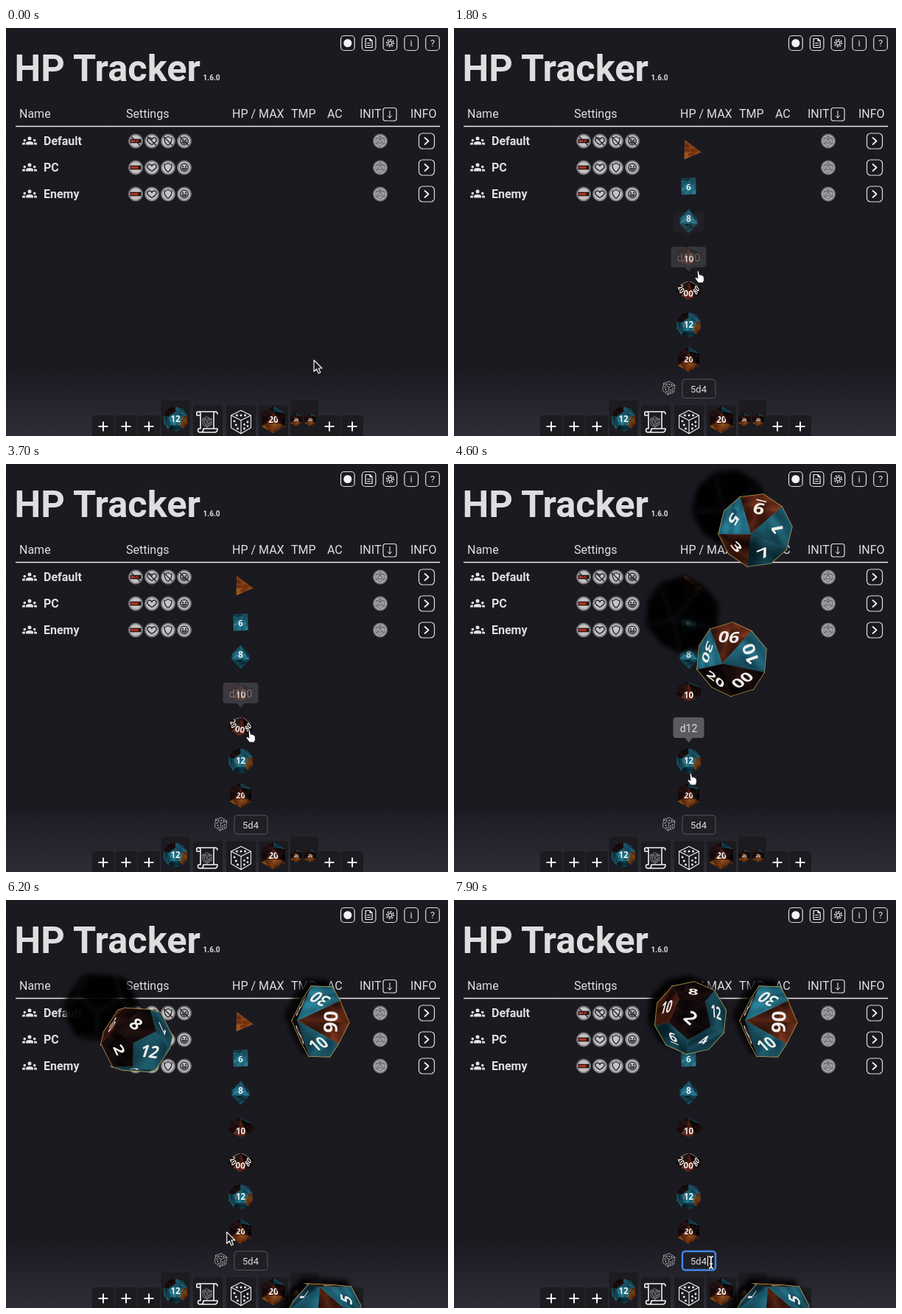
Animation of 600x554 px, one loop 8000 ms. Source, as an HTML page with a canvas:

```html
<!DOCTYPE html>
<html lang="en">
<head>
<meta charset="utf-8">
<title>HP Tracker</title>
<style>
  html, body { margin: 0; width: 100%; height: 100%; overflow: hidden; background: #1b1920; }
  svg, canvas { position: absolute; left: 0; top: 0; width: 600px; height: 554px; }
  text { font-family: Roboto, "Liberation Sans", sans-serif; fill: #dededf; }
  .mid { text-anchor: middle; dominant-baseline: central; }
  .line { fill: none; stroke: #f2f2f2; stroke-linecap: round; stroke-linejoin: round; }
  .dark { fill: none; stroke: #29282c; stroke-width: 1.4; stroke-linejoin: round; }
  .box { fill: #1a191e; stroke: #e0e0e0; stroke-width: 1.2; }
  .slot { fill: #1c1b20; }
</style>
</head>
<body>
<svg viewBox="0 0 600 554" xmlns="http://www.w3.org/2000/svg">
  <defs>
    <linearGradient id="bg" x2="0" y2="1">
      <stop offset="0" stop-color="#1b1a20"/><stop offset=".83" stop-color="#1b1920"/><stop offset="1" stop-color="#2e2c35"/>
    </linearGradient>
    <radialGradient id="coin"><stop offset=".7" stop-color="#c4c4c5"/><stop offset="1" stop-color="#8d8d90"/></radialGradient>
    <g id="cube">
      <path class="line" d="M0-14 12-8V7L0 14-12 7V-8ZM-12-8 0-2 12-8M0-2V14"/>
      <path class="line" stroke-width="2.600" d="M0-8h0M-5-8h0M5-8h0M-8-1h0M-6 3.500h0M-4 8h0M4 3h0M8 0h0M8 5h0M4 8h0"/>
    </g>
    <g id="people" fill="#e4e4e4">
      <circle cy="-3.400" r="2.500"/><path d="M-5 5V3Q-5 .5 0 .5T5 3V5Z"/>
      <circle cx="-6.700" cy="-1" r="1.800"/><path d="M-10 5V3.500Q-10 1.800-6.300 1.800L-6 5Z"/>
      <circle cx="6.700" cy="-1" r="1.800"/><path d="M10 5V3.500Q10 1.800 6.300 1.800L6 5Z"/>
    </g>
    <circle id="coinface" r="9.300" fill="url(#coin)" stroke="#737377" stroke-width="1.500"/>
  </defs>

  <rect width="600" height="554" fill="url(#bg)"/>
  <text x="11.500" y="71.500" font-size="50.500" font-weight="700">HP Tracker</text>
  <text x="267.500" y="71" font-size="10" font-weight="700">1.6.0</text>
  <g id="tools"></g>
  <g id="head" font-size="16"></g>
  <rect x="512" y="108.500" width="18" height="17.500" rx="3" class="box" stroke-width="1"/>
  <path class="line" d="M521 112.500V122M518.500 119.500 521 122 523.500 119.500"/>
  <path d="M13 133.500H589" stroke="#e6e6e6" stroke-width="1.500"/>
  <g id="rows"></g>
  <g id="dock"></g>
  <g id="panel">
    <use href="#cube" transform="translate(291.500 489) rotate(8) scale(.64)" opacity=".85"/>
    <rect id="field" x="310" y="477" width="45" height="25.500" rx="4" fill="#201f25"/>
    <text x="332" y="490" font-size="13" class="mid">5d4</text>
    <path id="caret" d="M344.500 483V497" stroke="#fff"/>
  </g>
</svg>
<canvas id="tray" width="600" height="554"></canvas>
<svg id="tips" viewBox="0 0 600 554"></svg>
<canvas id="table" width="600" height="554"></canvas>
<svg viewBox="0 0 600 554">
  <g id="cursor">
    <path d="M0 0V15.500L3.600 12 6.200 18 8.800 16.800 6.300 11H11Z" fill="#17161a" stroke="#f4f4f4" stroke-width="1.200" stroke-linejoin="round"/>
    <path d="M-3-7.500Q-1.500-9-.6-7.300L.5-2.500Q1.800-4 2.600-2.300 4-3.200 4.600-1.500 6-2 6.200 0L6.500 4.500 5 8H-1.500L-6 2Q-6 0-4 .6L-2.200 2Z" fill="#fff" stroke="#161519"/>
    <path d="M-3-8Q0-8 0-5V5Q0 8-3 8M3-8Q0-8 0-5M0 5Q0 8 3 8M-2 2H2" fill="none" stroke="#fff" stroke-width="1.600"/>
  </g>
</svg>
<script>
const LOOP = 8000, STEP = 100;
const $ = id => document.getElementById(id);
const clamp = v => Math.max(0, Math.min(1, v));
const at = (x, y, body, s = 1) => `<g transform="translate(${x} ${y}) scale(${s})">${body}</g>`;

// Header, tool buttons, group rows, dock
const labels = { Name: 18, Settings: 163, 'HP / MAX': 307, TMP: 387, AC: 436, INIT: 480, INFO: 549 };
$('head').innerHTML = Object.entries(labels).map(([s, x]) => `<text x="${x}" y="122">${s}</text>`).join('');

const tools = [
  '<circle r="5.500" fill="#f4f4f4"/>',
  '<path class="line" stroke-width="1.200" d="M-4.500-6H1.500L4.500-3V6H-4.500ZM1.500-6V-3H4.500M-2 0H2M-2 3H2"/>',
  '<circle class="line" r="2.600" stroke-width="1.200"/><circle class="line" r="4.800" stroke-width="1.500" stroke-dasharray="1 2.770"/>',
  '<text class="mid" font-size="13">i</text>',
  '<text class="mid" font-size="13">?</text>'
];
$('tools').innerHTML = tools.map((icon, i) =>
  at(463.8 + 28.8 * i, 20.5, '<rect x="-9.300" y="-10" width="18.600" height="20" rx="4.500" class="box"/>' + icon)).join('');

const badges = [
  '<rect x="-7.500" y="-2.800" width="15" height="5.600" fill="#241312"/><rect x="-6.500" y="-1.500" width="10" height="3" fill="#b8321f"/>',
  '<path class="dark" d="M0 5Q-10-1-4-4.500Q-1-5 0-2Q1-5 4-4.500Q10-1 0 5Z"/>',
  '<path class="dark" d="M0-6Q3-4 5-4Q5 3 0 6Q-5 3-5-4Q-3-4 0-6Z"/>',
  '<circle class="dark" r="5.300"/><path class="dark" d="M-3 1Q0 5.500 3 1Z"/><circle cx="-2" cy="-1.500" r="1"/><circle cx="2" cy="-1.500" r="1"/>'
];
const coin = body => '<use href="#coinface"/>' + body;
const slash = '<path class="dark" d="M-6-6 6 6"/>';
const d20Line = '<path fill="#a2a2a4" stroke="#626265" d="M0-7 6-3.500V3.500L0 7-6 3.500V-3.500ZM0-3.500 3.500 2.500H-3.500ZM0-7V-3.500M6 3.500 3.500 2.500M-6 3.500-3.500 2.500M-6-3.500H6"/>';
$('rows').innerHTML = ['Default', 'PC', 'Enemy'].map((name, i) => at(0, 153 + 36 * i,
  at(32, 0.5, '<use href="#people"/>') +
  `<text x="51" y="5.500" font-size="16" font-weight="700">${name}</text>` +
  badges.map((b, k) => at(176 + 22 * k, 0.5, coin(b + (i ? '' : slash)))).join('') +
  at(508, 0.5, coin(d20Line)) +
  at(571, 0.5, '<rect x="-10.500" y="-10.500" width="21" height="21" rx="5" class="box"/><path class="line" stroke-width="1.800" d="M-2.500-4.500 2.500 0-2.500 4.500"/>')
)).join('');

const slot = (x, y, w) => `<rect x="${x - w / 2}" y="${y}" width="${w}" height="60" rx="3" class="slot"/>`;
const plus = x => slot(x, 526, 30) + `<path d="M${x - 6.5} 541H${x + 6.5}M${x} 534.500V547.500" stroke="#f4f4f4" stroke-width="2"/>`;
const scroll = '<path class="line" stroke-width="1.600" d="M-9 9V-11Q-9-14-12-14T-14-11V-9H-9M-12-14H11Q14-14 14-11M11-14Q9-14 9-10V8M-9 9H-12Q-14 14-9 14H10Q14 14 14 9H-5Q-5 14-9 14"/>';
const cube = s => at(0, 0, '<use href="#cube"/>', s);
$('dock').innerHTML = [132, 163, 194, 439, 470].map(plus).join('') +
  slot(230, 506, 39) + slot(405, 506, 38) + [274, 319, 363].map(x => slot(x, 512, 40)).join('') +
  at(273, 535, scroll + cube(.5)) + at(319, 535, cube(1.12));

// Vectors and rotation matrices (x right, y down, z to the viewer)
const RAD = Math.PI / 180;
const dot = (a, b) => a[0] * b[0] + a[1] * b[1] + a[2] * b[2];
const cross = (a, b) => [a[1] * b[2] - a[2] * b[1], a[2] * b[0] - a[0] * b[2], a[0] * b[1] - a[1] * b[0]];
const mix = (a, p, b, q) => a.map((v, i) => v * p + b[i] * q);
const unit = v => v.map(c => c / Math.hypot(...v));
const apply = (m, v) => m.map(row => dot(row, v));
const flip = m => m[0].map((_, i) => m.map(row => row[i]));
const mul = (a, b) => a.map(row => flip(b).map(col => dot(row, col)));
function rot(axis, angle) {
  const turn = v => mix(mix(v, Math.cos(angle), cross(axis, v), Math.sin(angle)), 1, axis, dot(axis, v) * (1 - Math.cos(angle)));
  return flip([[1, 0, 0], [0, 1, 0], [0, 0, 1]].map(turn));
}

// A solid is the space inside the planes with the given normals, scaled to radius 50
const near = (a, b) => Math.abs(a - b) < 2e-3;
const ring = (n, polar, phase = 0) => Array.from({ length: n }, (_, i) => {
  const a = (phase + 360 * i / n) * RAD, p = polar * RAD;
  return [Math.sin(p) * Math.cos(a), Math.sin(p) * Math.sin(a), Math.cos(p)];
});
const paired = list => [...list, ...list.map(n => n.map(v => -v))];
const top1 = [0, 0, 1];

function solid(normals, twist = () => 0) {
  const points = [];
  normals.forEach((a, i) => normals.slice(0, i).forEach((b, j) => normals.slice(0, j).forEach(c => {
    const det = dot(a, cross(b, c));
    if (Math.abs(det) < 1e-3) return;
    const p = mix(mix(cross(b, c), 1, cross(c, a), 1), 1 / det, cross(a, b), 1 / det);
    if (normals.every(n => dot(n, p) < 1.002) && !points.some(q => p.every((v, k) => near(v, q[k])))) points.push(p);
  })));
  const scale = 50 / Math.max(...points.map(p => Math.hypot(...p)));
  return normals.map((n, k) => {
    const ref = Math.abs(n[2]) > .99 ? normals[3] : top1;
    const up = unit(mix(ref, 1, n, -dot(ref, n))), side = cross(n, up), a = twist(k) * RAD;
    const down = mix(up, -Math.cos(a), side, Math.sin(a));
    const right = cross(down, n);
    const corners = points.filter(p => near(dot(p, n), 1));
    const center = corners.reduce((s, p) => mix(s, 1, p, scale / corners.length), [0, 0, 0]);
    const flat = corners.map(p => mix(p, scale, center, -1)).map(p => [dot(p, right), dot(p, down)])
      .sort((p, q) => Math.atan2(p[1], p[0]) - Math.atan2(q[1], q[0]));
    return { n, right, down, center, flat };
  });
}

const kite = solid([...ring(5, 45), ...ring(5, 135, 36)]);
const dodeca = solid(paired([top1, ...ring(5, 63.435)]), k => 72 * k - 108);
const icosa = solid(paired([...ring(5, 37.377), ...ring(5, 79.188)]));
const kind = (faces, text, skin, size) => ({ faces, text: text.split(' '), skin, size });
const kinds = {
  d4: kind(solid([top1, ...ring(3, 109.471)]), '', 'otkr', 30),
  d6: kind(solid([top1, ...ring(4, 90), [0, 0, -1]]), '6', 't', 34),
  d8: kind(solid(paired(ring(4, 54.736))), '8', 't', 36),
  d10: kind(kite, '10', 'rkktk', 34),
  d100: kind(kite, '00 20 50 60 80', 'rkkrk', 34),
  d12: kind(dodeca, '12', 'tottkt', 34),
  d20: kind(icosa, '20', 'rkktkokook', 32),
  ten: kind(kite, '9 1 7 3 5 8 6 4 2 0', 'rtt', 27),
  hundred: kind(kite, '90 10 00 20 30 40 50 60 70 80', 'rtkkt', 26),
  twelve: kind(dodeca, '2 4 6 10 8 12 11 9 7 3 5 1', 'kttrktkrtkkr', 25)
};

// Marbled resin, one tile per colour
function marble(dark, light, seed) {
  const c = document.createElement('canvas'), size = c.width = c.height = 160;
  const g = c.getContext('2d'), img = g.createImageData(size, size);
  for (let y = 0; y < size; y++) for (let x = 0; x < size; x++) {
    const w = Math.sin(x / 21 + seed) + Math.sin(y / 13 + 1.6 * Math.sin(x / 11 + seed)) + .7 * Math.sin((x + y) / 7 + 2 * Math.sin(y / 17));
    const rgb = mix(dark, 1 - clamp(.5 + w / 5), light, clamp(.5 + w / 5));
    img.data.set([...rgb, 255], 4 * (y * size + x));
  }
  g.putImageData(img, 0, 0);
  return g.createPattern(c, 'repeat');
}
const skins = {
  t: marble([10, 42, 54], [44, 136, 162], 1),
  r: marble([24, 9, 9], [128, 54, 28], 2),
  k: marble([4, 3, 5], [46, 22, 20], 3),
  o: marble([112, 46, 14], [228, 140, 50], 4)
};

function pose(name, [face, tx, ty, spin]) {
  const f = kinds[name].faces[face], lean = Math.hypot(tx, ty);
  const tilt = lean ? rot([-ty / lean, tx / lean, 0], Math.asin(lean)) : rot(top1, 0);
  return mul(mul(tilt, rot(top1, spin * RAD)), [f.right, f.down, f.n]);
}

function eachFace(g, name, m, x, y, radius, paint) {
  kinds[name].faces.forEach((f, k) => {
    const n = apply(m, f.n);
    if (n[2] < .01) return;
    const s = radius / 50, [r, d, c] = [f.right, f.down, f.center].map(v => apply(m, v).map(q => q * s));
    g.save();
    g.transform(r[0], r[1], d[0], d[1], x + c[0], y + c[1]);
    g.beginPath();
    f.flat.forEach(p => g.lineTo(...p));
    g.closePath();
    paint(k, n);
    g.restore();
  });
}

function drawDie(g, name, m, x, y, radius) {
  const { text, skin, size } = kinds[name];
  if (radius > 20) eachFace(g, name, m, x, y, radius, () => {
    g.strokeStyle = '#c4a650';
    g.lineWidth = 1.8;
    g.resetTransform();
    g.stroke();
  });
  eachFace(g, name, m, x, y, radius, (k, n) => {
    g.save();
    g.translate(k * 37, k * 53);
    g.fillStyle = g.strokeStyle = skins[skin[k % skin.length]];
    g.lineWidth = .5;
    g.fill();
    g.stroke();
    g.restore();
    g.fillStyle = `rgba(0,0,0,${.4 * clamp(1 - dot(n, [-.3, -.35, .9]))})`;
    g.fill();
    if (!text[k]) return;
    g.font = `700 ${size}px "Open Sans", "Noto Sans", sans-serif`;
    g.textAlign = 'center';
    g.textBaseline = 'middle';
    g.fillStyle = '#f1efec';
    g.fillText(text[k], 0, 2);
    if (radius > 20 && /^[69]$/.test(text[k])) g.fillRect(-7, size * .45, 14, 2);
  });
}

function drawShadow(g, name, m, x, y) {
  g.save();
  g.filter = 'blur(3px)';
  g.globalAlpha = .95;
  eachFace(g, name, m, x, y, 53, () => g.fill());
  g.restore();
}

// Dice in the tray: face, lean and turn
const tray = { d4: [0, .35, -.3, 35], d6: [0, 0, .15, -2], d8: [0, 0, -.3, 0], d10: [0, 0, 0, 0], d100: [0, 0, 0, 4], d12: [0, 0, 0, 0], d20: [0, 0, 0, 0] };
const names = Object.keys(tray);
const trayX = 318.5, trayY = name => 168 + 47 * names.indexOf(name);
const pressed = { d100: 3700, d12: 5400 };

// Throws: time, x, y, height, [face, lean x, lean y, turn]
const onNine = [0, .05, -.6, 195], onFive = [4, .6, -.6, -80];
const onApex = [0, -.2, -.6, 188], onNinety = [0, 0, 0, -88];
const throws = {
  ten: [[3800, 440, 420, 40, onFive], [4600, 409, 90, 34, onNine], [5400, 430, 562, 10, onFive], [5800, 432, 556, 8, onFive]],
  hundred: [[3800, 190, 430, 40, onNinety], [4600, 377, 265, 67, onApex], [5200, 425, 161, 8, onNinety], [5700, 427, 165, 8, onNinety]],
  twelve: [[5500, 230, 470, 40, [4, 0, 0, 0]], [6300, 170, 150, 50, [5, 0, 0, 60]], [6900, 302, 117, 7, [3, .1, -.05, 86]], [7500, 321, 160, 7, [0, 0, 0, 42]]]
};

// Rolls between two poses about their common axis, with more turns on longer ways
function roll(name, keys, t) {
  const i = keys.findIndex(k => k[0] > t), last = keys[keys.length - 1];
  if (i < 0) return [...last.slice(1, 4), pose(name, last[4])];
  const a = keys[i - 1], b = keys[i], f = (t - a[0]) / (b[0] - a[0]);
  const end = pose(name, b[4]), m = mul(pose(name, a[4]), flip(end));
  const axis = [m[2][1] - m[1][2], m[0][2] - m[2][0], m[1][0] - m[0][1]];
  const angle = Math.acos(Math.max(-1, Math.min(1, (m[0][0] + m[1][1] + m[2][2] - 1) / 2)));
  const turns = Math.round(Math.hypot(b[1] - a[1], b[2] - a[2]) / 220);
  const spin = rot(Math.hypot(...axis) > 1e-6 ? unit(axis) : [.6, .8, 0], (angle + 2 * Math.PI * turns) * (1 - f));
  return [...mix(a.slice(1, 4), 1 - f, b.slice(1, 4), f), mul(spin, end)];
}

// Tooltips: hover start and end
const hovers = { d20: [1100, 1250], d10: [1450, 1620], d100: [1700, 3600], d12: [4150, 5500] };
const tipAlpha = ([from, to], t) => clamp(Math.min((t - from) / 240, (to + 200 - t) / 200));
$('tips').innerHTML = Object.keys(hovers).map(name => {
  const w = name.length > 3 ? 48 : 42;
  return `<g id="tip-${name}">` + at(318.5, trayY(name) - 45, '<path d="M-6 13H6L0 20Z" fill="#5b5a5f"/>' +
    `<rect x="${-w / 2}" y="-14" width="${w}" height="28" rx="4" fill="#5b5a5f"/><text class="mid" font-size="14" y=".5">${name}</text>`) + '</g>';
}).join('');

const pointer = [[0, 418, 451], [900, 320, 526], [1600, 333, 308], [1800, 333, 338], [3700, 332, 370],
  [4600, 323, 428], [5400, 325, 413], [6900, 279, 482], [7700, 349, 492]];
function pointerAt(t) {
  const i = pointer.findIndex(k => k[0] > t);
  if (i < 0) return pointer[pointer.length - 1].slice(1);
  const a = pointer[i - 1], b = pointer[i], f = (t - a[0]) / (b[0] - a[0]), e = f * f * (3 - 2 * f);
  return mix(a.slice(1), 1 - e, b.slice(1), e);
}
const show = (el, on) => { el.style.display = on ? '' : 'none'; };
const trayArt = $('tray').getContext('2d'), tableArt = $('table').getContext('2d');

function render(t) {
  const open = clamp((t - 500) / 400);
  $('panel').setAttribute('opacity', open);
  trayArt.clearRect(0, 0, 600, 554);
  const still = (name, x, y, r, spin = 0) => {
    const [face, tx, ty, turn] = tray[name];
    drawDie(trayArt, name, pose(name, [face, tx, ty, turn + spin]), x, y, r);
  };
  still('d12', 230, 531, 17);
  still('d20', 363, 532, 18.5);
  [394, 413].forEach(x => still('d20', x, 532, 9));
  trayArt.globalAlpha = open;
  names.forEach(n => still(n, trayX, trayY(n) + 24 * (1 - open), 17, t === pressed[n] ? 8 : 0));
  trayArt.globalAlpha = 1;
  for (const n in hovers) $('tip-' + n).setAttribute('opacity', tipAlpha(hovers[n], t));

  tableArt.clearRect(0, 0, 600, 554);
  const live = Object.entries(throws).filter(([, keys]) => t >= keys[0][0]).map(([n, keys]) => [n, ...roll(n, keys, t)]);
  live.forEach(([n, x, y, h, m]) => drawShadow(tableArt, n, m, x - h, y - h * .9));
  live.forEach(([n, x, y, , m]) => drawDie(tableArt, n, m, x, y, 50));

  const focus = t >= 7600;
  $('field').setAttribute('stroke', focus ? '#4288e6' : '#55545a');
  $('field').setAttribute('stroke-width', focus ? 2.4 : 1);
  show($('caret'), focus);

  const shape = t < 600 ? 0 : t < 6000 ? 1 : t < 7400 ? 0 : 2;
  [...$('cursor').children].forEach((c, i) => show(c, i === shape));
  $('cursor').setAttribute('transform', `translate(${pointerAt(t)})`);
}

const start = performance.now();
let shown = -1;
function tick(now) {
  const t = Math.floor(Math.max(0, now - start) % LOOP / STEP) * STEP;
  if (t !== shown) render(shown = t);
  requestAnimationFrame(tick);
}
tick(start);
</script>
</body>
</html>
```
